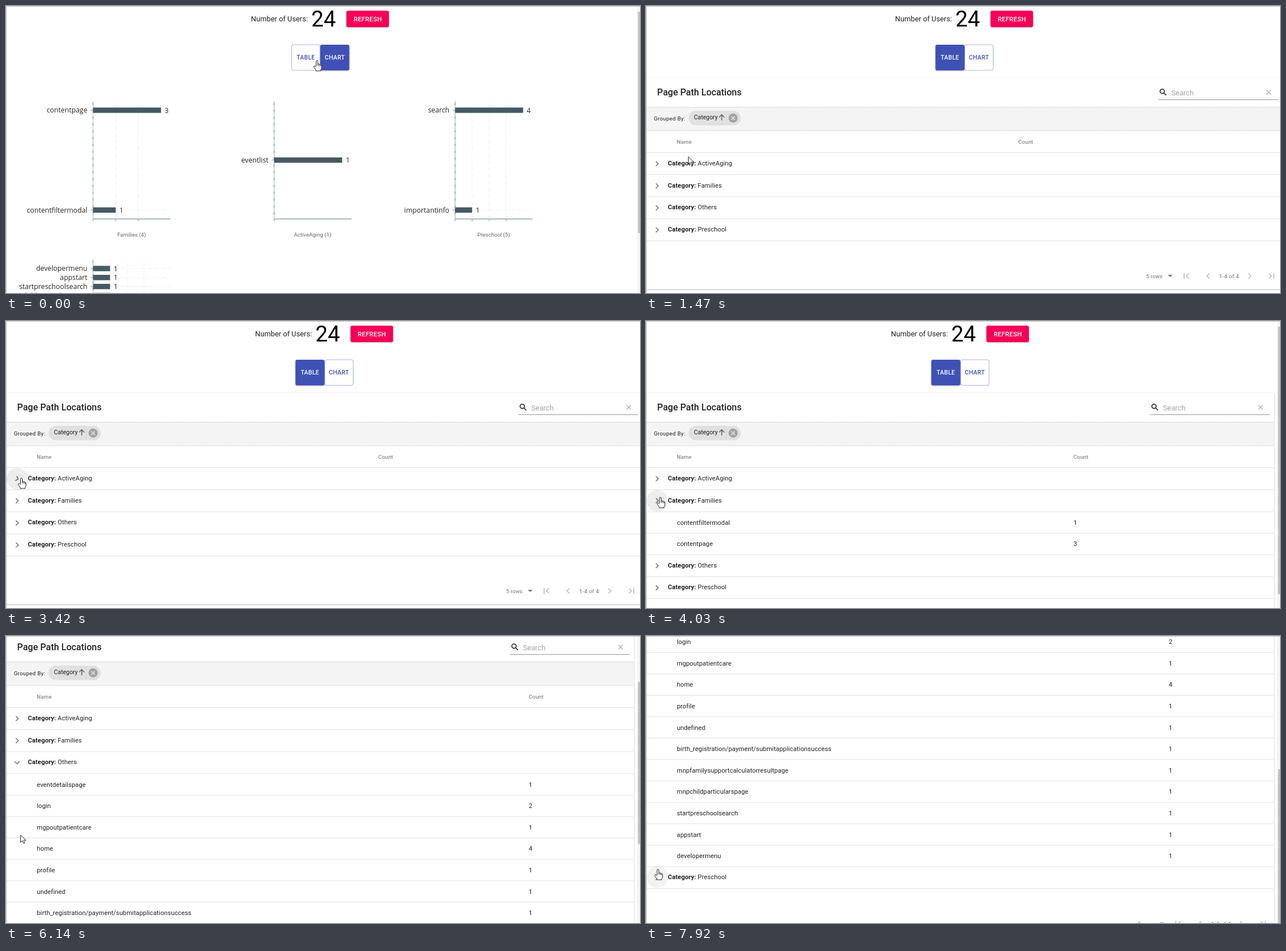
Write an HTML page that moves like this. It is 1111 px wide and 504 px high and loops after 8000 ms.

```html
<!DOCTYPE html>
<html lang="en">
<head>
<meta charset="utf-8">
<title>Page path locations</title>
<style>
html, body { margin: 0; width: 100%; height: 100%; overflow: hidden; background: #fff; }
svg { display: block; width: 1111px; height: 504px; }
text { font: 11.2px Roboto, sans-serif; fill: rgba(0,0,0,.87); white-space: pre; }
.body { letter-spacing: .006em; }
.body tspan { font-weight: 700; }
.users { font-size: 12.8px; }
.total { font-size: 38.4px; fill: #000; }
.button { font-weight: 500; letter-spacing: .02857em; fill: #fff; }
.toggle { font-size: 10.4px; }
.off { fill: #3f51b5; }
.title { font-size: 16px; font-weight: 500; }
.search { font-size: 12.8px; fill: #a2a2a2; }
.caption { font-size: 9.6px; letter-spacing: .033em; }
.chip { font-size: 10.4px; }
.head { font-size: 9.6px; font-weight: 500; letter-spacing: .01071em; fill: #8a8a8a; }
.muted { fill: #707070; }
.rows { font-size: 9.6px; fill: #707070; }
.tick { font: 12.2px "Open Sans", sans-serif; fill: #252525; }
.name { font-size: 9.6px; fill: #666; }
.icon { fill: none; stroke: rgba(0,0,0,.54); stroke-width: 1.6; }
.pale { stroke: rgba(0,0,0,.28); }
.raised { filter: drop-shadow(0 1px 1.2px rgba(0,0,0,.32)); }
.paper { fill: #fff; filter: drop-shadow(0 1px 1.5px rgba(0,0,0,.28)); }
.grid { fill: none; stroke: #eceff1; stroke-width: 1.1; stroke-dasharray: 8 4; }
.axis { fill: none; stroke: #90a4ae; stroke-width: 1.7; }
</style>
</head>
<body>
<svg viewBox="0 0 1111 504">
  <g id="page"></g>
  <g id="bar">
    <rect x="1106" width="5" height="504" fill="#f4f4f4"/>
    <rect id="thumb" x="1107.5" y="10" width="4" fill="#c1c1c1"/>
  </g>
  <path d="M0 .5H1111M.5 0V504" stroke="#bcbcbc" fill="none"/>
  <circle id="halo" cx="19.7" r="19"/>
  <g id="cursor" fill="#fff" stroke="#222" stroke-linejoin="round">
    <path id="arrow" d="M.5 .5V13.6L3.7 10.6 5.8 15.3 7.9 14.3 5.9 9.8H10Z"/>
    <path id="hand" d="M-1.5 10V1.2Q-1.4 -.3 0 -.3T1.5 1.2V6Q3 4.9 4 6.5 5.6 5.6 6.3 7.3 8.2 6.9 8 9V13Q7.8 15 6.5 16.2V18H-2V16.2L-5.6 11.4Q-6 9.4 -4 9.2L-1.5 11.5M1.5 6V9M4 6.5V9.5M6.3 7.5V10"/>
  </g>
</svg>
<script>
const LOOP = 8000, VIEW = 534, TRACK = 509, GROUP = 38.75, ROW = 37.6, CHART = -2;
const $ = id => document.getElementById(id);

const categories = [
  { name: 'ActiveAging', countX: 672, items: ['eventlist 1'] },
  { name: 'Families', countX: 749, items: ['contentfiltermodal 1', 'contentpage 3'] },
  { name: 'Others', countX: 916, items: ['eventdetailspage 1', 'login 2', 'mgpoutpatientcare 1', 'home 4',
    'profile 1', 'undefined 1', 'birth_registration/payment/submitapplicationsuccess 1',
    'mnpfamilysupportcalculatorresultpage 1', 'mnpchildparticularspage 1', 'startpreschoolsearch 1',
    'appstart 1', 'developermenu 1'] },
  { name: 'Preschool', items: [] }
];

// [time, opened category]; -1 means all closed
const views = [[0, CHART], [470, -1], [2700, 0], [3260, -1], [4000, 1], [4740, -1], [5350, 2]];
const path = [[0, 545, 96], [80, 545, 96], [230, 543, 98], [620, 543, 98], [780, 430, 130], [940, 300, 168],
  [1090, 205, 212], [1170, 160, 240], [1320, 108, 256], [1470, 74, 264], [1550, 55, 280], [1620, 64, 292],
  [1780, 119, 217], [1930, 119, 217], [2170, 23, 276], [2320, 23, 276], [2400, 27, 276], [3420, 27, 276],
  [3720, 25, 310], [4820, 25, 310], [5120, 25, 348], [5890, 25, 349], [7480, 25, 349], [7900, 21, 410]];
const scrolls = [[5820, 0], [6140, 132], [6450, 132], [6690, 264], [6920, 264], [7230, 420]];
const halos = [[2250, 0], [2400, .07], [3420, .07], [3560, 0], [3640, 0], [3780, .07],
  [4820, .07], [4960, 0], [5020, 0], [5200, .07], [5740, .07], [5890, 0], [7760, 0], [7920, .05]];
const hands = [[0, 640], [2090, 5880], [7750, LOOP]];

const text = (x, y, str, cls, anchor = 'start') =>
  `<text x="${x}" y="${y}" class="${cls}" text-anchor="${anchor}">${str}</text>`;
const rect = (x, y, w, h, fill, extra = '') =>
  `<rect x="${x}" y="${y}" width="${w}" height="${h}" fill="${fill}" ${extra}/>`;
const icon = (x, y, d, cls = '') =>
  `<path class="icon ${cls}" transform="translate(${x} ${y})" d="${d}"/>`;
const rule = (y, width) => rect(1, y - .5, width - 1, 1, '#e0e0e0');
const CHEVRON = 'M-2.2-4.2 2-0-2.2 4.2', BACK = 'M2.2-4.2-2 0 2.2 4.2', CROSS = 'M-4-4 4 4M4-4-4 4';

function toggle(x, label, on) {
  const box = on ? rect(x, 68, 50.8, 45, '#3f51b5', 'rx="3" class="raised"')
    : rect(x + .5, 68, 49.8, 45, '#fff', 'rx="3" stroke="#3f51b5" stroke-opacity=".45"');
  return box + text(x + 25.4, 94, label, 'button toggle' + (on ? '' : ' off'), 'middle');
}

function header(chart, dx) {
  const table = toggle(500, 'TABLE', !chart), graph = toggle(550.8, 'CHART', chart);
  return `<g transform="translate(${dx})">` + text(429.3, 27, 'Number of Users:', 'users') +
    text(535, 36, '24', 'total') + rect(596.5, 8.3, 74.5, 28.7, '#f50057', 'rx="3" class="raised"') +
    text(634, 26.5, 'REFRESH', 'button', 'middle') + (chart ? table + graph : graph + table) + '</g>';
}

function chart(x, top, caption, max, bars) {
  const bottom = top + 207, unit = 119.2 / max;
  let out = `<path class="axis" d="M${x} ${top}V${bottom}M${x} ${bottom}h135.5"/>`;
  for (let i = 0; i < max; i++) {
    out += `<path class="grid" d="M${x + i * unit} ${bottom}V${top}" ${i ? '' : 'stroke-width="2"'}/>` +
      `<path class="axis" stroke-opacity=".7" d="M${x + i * unit} ${bottom}v4"/>`;
  }
  for (const [label, value, y] of bars) {
    const end = x + value * unit;
    out += `<path class="grid" d="M${x} ${y}h135.5"/><path class="axis" stroke-opacity=".7" d="M${x} ${y}h-4.5"/>` +
      rect(x, y - 4.7, end - x, 9.4, '#455a64') +
      text(x - 10, y + 4.3, label, 'tick', 'end') + text(end + 6.4, y + 4.5, value, 'tick');
  }
  return out + text(x + 67.5, bottom + 30.5, caption, 'name', 'middle');
}

function chartPage() {
  const names = ['developermenu', 'appstart', 'startpreschoolsearch', 'mnpchildparticularspage'];
  return header(true, 0) +
    chart(152.5, 167, 'Families (4)', 3, [['contentpage', 3, 183], ['contentfiltermodal', 1, 358.3]]) +
    chart(469.8, 167, 'ActiveAging (1)', 1, [['eventlist', 1, 270.6]]) +
    chart(787, 167, 'Preschool (5)', 4, [['search', 4, 183], ['importantinfo', 1, 358.3]]) +
    chart(152.5, 444, 'Others (16)', 4, names.map((name, i) => [name, 1, 461 + i * 15.8]));
}

function toolbar(right) {
  return text(19.5, 157.3, 'Page Path Locations', 'title') +
    `<g transform="translate(${right - 1115})">` +
    '<g class="icon" style="stroke:#222"><circle cx="904.7" cy="149.8" r="3.8"/><path d="M907.4 152.5l4.3 4.3"/></g>' +
    text(920.5, 156.5, 'Search', 'search') + icon(1091.3, 151.5, CROSS, 'pale') +
    rect(898, 164, 210, 1, '#949494') + '</g>' +
    rect(1, 177.5, right - 1, 41.5, '#f4f4f4') +
    `<path d="M1 177.7H${right}M1 219H${right}" stroke="#ccc" stroke-dasharray="2 1"/>` +
    text(13.7, 201, 'Grouped By:', 'caption') + rect(74.5, 184, 91.5, 25.6, '#e0e0e0', 'rx="12.8"') +
    text(84, 199, 'Category', 'chip') + icon(132.7, 195.5, 'M0 5.5V-4.5M-4.6 0 0-4.6 4.6 0') +
    '<circle cx="152.7" cy="196.8" r="8" fill="#a3a3a3"/>' +
    '<path d="M149.6 193.7l6.2 6.2m0-6.2l-6.2 6.2" stroke="#e0e0e0" stroke-width="1.6"/>';
}

function footer(y, right) {
  return `<g transform="translate(${right - 1115} ${y})">` + text(876.5, 3.5, '5 rows', 'rows') +
    '<path d="M914.5-2h8l-4 4z" fill="#757575"/>' + icon(949, 0, BACK + 'M-6-5V5', 'pale') +
    icon(985, 0, BACK, 'pale') + text(1004.5, 3.5, '1-4 of 4', 'caption muted') +
    icon(1058, 0, CHEVRON, 'pale') + icon(1094, 0, CHEVRON + 'M6-5V5', 'pale') + '</g>';
}

function tablePage(open) {
  const wide = open < 0, right = wide ? 1115 : 1100.5;
  const countX = wide ? 652.3 : categories[open].countX;
  let y = 257.5, rows = rule(y, right);
  categories.forEach(({ name, items }, i) => {
    rows += `<g transform="translate(19.5 ${y + 19.5})"><path id="chevron${i}" class="icon" d="${CHEVRON}"/></g>` +
      text(38.3, y + 22.4, `<tspan>Category:</tspan> ${name}`, 'body');
    rows += rule(y += GROUP, right);
    if (i !== open) return;
    for (const item of items) {
      const [label, count] = item.split(' ');
      rows += text(54, y + 22.8, label, 'body') + text(countX, y + 22.8, count, 'body');
      rows += rule(y += ROW, right);
    }
  });
  return header(false, wide ? 7.25 : 0) + `<rect class="paper" x="1" y="126" width="${right - 1}" height="${y - 41.5}"/>` +
    toolbar(right) + text(54, 241.5, 'Name', 'head') + text(countX, 241.5, 'Count', 'head') +
    rows + footer(y + 61.5, right);
}

// Interpolates every value of a [time, ...values] list
function track(keys, t, ease = u => u) {
  const next = keys.findIndex(key => key[0] > t);
  if (next === 0) return keys[0].slice(1);
  if (next < 0) return keys[keys.length - 1].slice(1);
  const a = keys[next - 1], b = keys[next], u = ease((t - a[0]) / (b[0] - a[0]));
  return a.slice(1).map((v, i) => v + (b[i + 1] - v) * u);
}

const smooth = u => u * u * (3 - 2 * u);
const pageHeight = open => open === CHART ? 699 : 503.5 + categories[open].items.length * ROW;
let shown;

function render(t) {
  const index = views.filter(view => view[0] <= t).length - 1, [since, open] = views[index];
  if (open !== shown) {
    $('page').innerHTML = open === CHART ? chartPage() : tablePage(open);
    $('bar').style.display = open === -1 ? 'none' : '';
    if (open !== -1) $('thumb').setAttribute('height', TRACK * VIEW / pageHeight(open));
    shown = open;
  }
  if (open !== CHART) {
    const turn = 90 * smooth(Math.min(1, (t - since) / 220));
    const before = views[index - 1][1];
    categories.forEach((_, i) => {
      const angle = i === open ? turn : i === before ? 90 - turn : 0;
      $('chevron' + i).setAttribute('transform', `rotate(${angle})`);
    });
  }
  const [scroll] = track(scrolls, t, smooth);
  $('page').setAttribute('transform', `translate(0 ${-scroll})`);
  if (open !== -1) $('thumb').setAttribute('y', 10 + scroll * TRACK / pageHeight(open));

  $('halo').setAttribute('cy', t < 3600 ? 277 : t < 5000 ? 315.8 : t < 7000 ? 354.5 : 423.5);
  $('halo').setAttribute('fill-opacity', track(halos, t)[0]);
  $('cursor').setAttribute('transform', `translate(${track(path, t).join(' ')})`);
  const hand = hands.some(([from, to]) => t >= from && t < to);
  $('hand').style.display = hand ? '' : 'none';
  $('arrow').style.display = hand ? 'none' : '';
}

const start = performance.now();
function tick() {
  render((performance.now() - start) % LOOP);
  requestAnimationFrame(tick);
}
tick();
</script>
</body>
</html>
```
